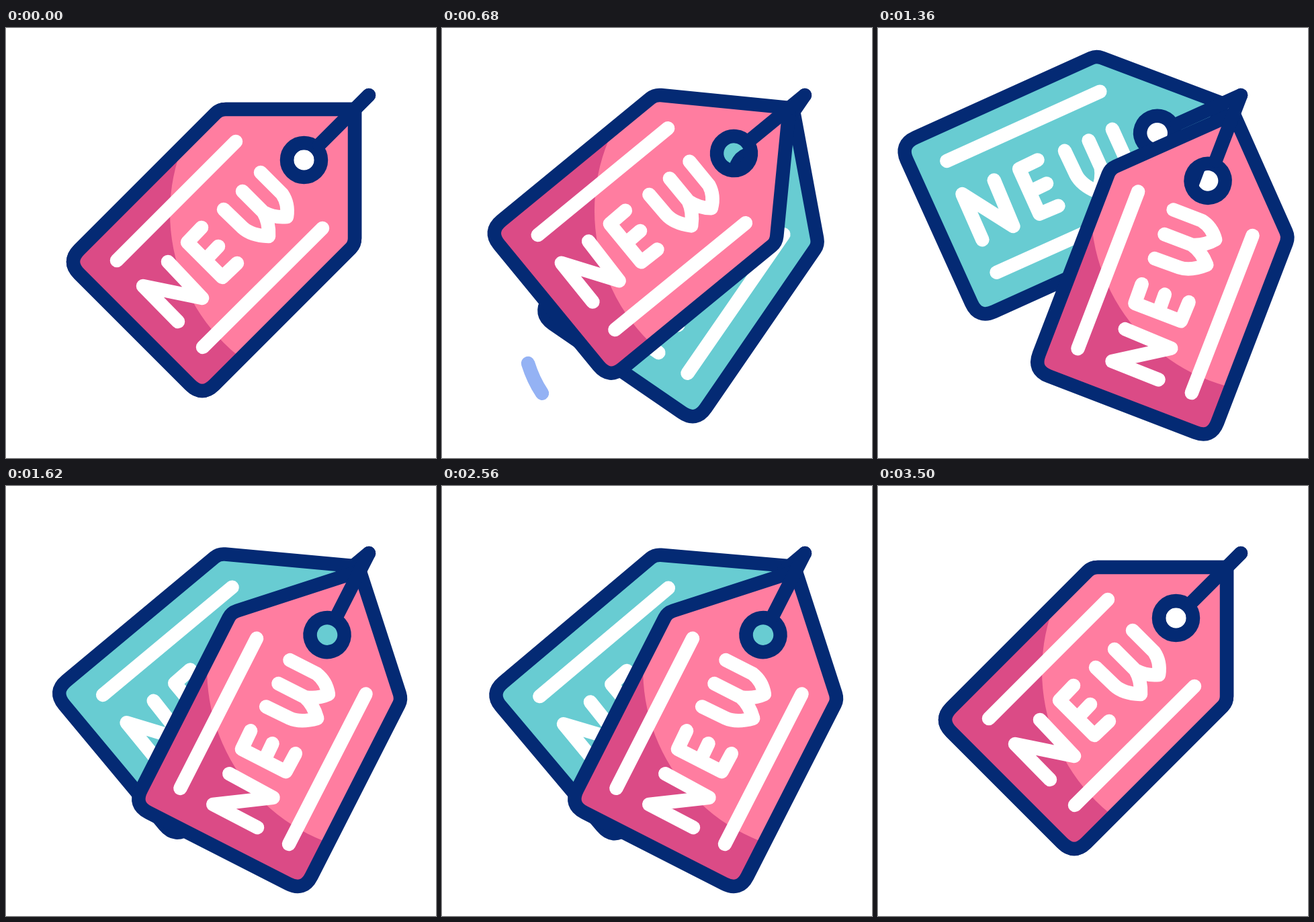
Recreate the animation shown at these times as an HTML page with a canvas. Size 640x640 px, loop 3.6 s.

```html
<!DOCTYPE html>
<html lang="en">
<head>
<meta charset="utf-8">
<title>New tags</title>
<style>
html, body { margin: 0; width: 100%; height: 100%; overflow: hidden; background: #fff; }
canvas { display: block; width: 640px; height: 640px; }
</style>
</head>
<body>
<canvas id="stage" width="640" height="640"></canvas>
<script>
const ctx = document.getElementById('stage').getContext('2d');
const LOOP = 3600, PIVOT = [540, 100], HOLE = [443.5, 196.5];
const NAVY = '#042a74', PINK = '#ff7da0', ROSE = '#db4b86', TEAL = '#68ccd2',
      YELLOW = '#ffcb52', BLUE = '#94b2f4';

const outline = new Path2D('M519 121H327Q318 121 312 127L109 330Q91 348 109 366L274 531' +
  'Q292 549 310 531L513 328Q519 322 519 313Z');
const body = new Path2D(outline);
body.moveTo(HOLE[0] + 25, HOLE[1]);
body.arc(...HOLE, 25, 0, Math.PI * 2);

const ring = new Path2D();
ring.arc(...HOLE, 25.5, 0, Math.PI * 2);
const cord = new Path2D('M466 174L540 100');
const bars = [new Path2D('M165 346L342 169'), new Path2D('M471 298L293 475')];
const BAR_LENGTH = 251;
const letters = new Path2D('M256 437L204 384L292 402L241 348' +
  'M291 297L270 319L322 371L344 350M297 345L316 325' +
  'M324 270L352 297Q365 309 391 310Q392 289 383 274L352 243' +
  'M383 274Q400 283 418 281Q421 262 411 247L379 215');

const swooshes = [
  { path: new Path2D('M128 499C150 570 215 634 350 600'), length: 272, head: [617, 852], tail: [890, 1240] },
  { path: new Path2D('M604 520C585 590 520 646 414 599'), length: 248, head: [2960, 3200], tail: [3150, 3500] }
];

// [time, degrees]
const frontSwing = [[200, 0], [580, 8.1], [1200, -26.8], [1627, -18], [2816, -18], [3256, 5.2], [3420, 0]];
const backSwing = [[200, 0], [618, -11.4], [1277, 23], [1650, 4.9], [2850, 4.9], [3280, -5], [3420, 0]];

function ease(t, from, to) {
  const x = Math.min(1, Math.max(0, (t - from) / (to - from)));
  return x * x * (3 - 2 * x);
}

function swing(t, keys) {
  let angle = keys[0][1];
  for (let i = 1; i < keys.length; i++) {
    angle += (keys[i][1] - keys[i - 1][1]) * ease(t, keys[i - 1][0], keys[i][0]);
  }
  return angle;
}

function stroke(path, color) {
  ctx.strokeStyle = color;
  ctx.stroke(path);
}

function strokePart(path, length, start, end, color) {
  if (end - start < 0.001) return;
  ctx.setLineDash([(end - start) * length, length * 2]);
  ctx.lineDashOffset = -start * length;
  stroke(path, color);
  ctx.setLineDash([]);
}

function drawTag(degrees, isFront, t) {
  ctx.save();
  ctx.translate(...PIVOT);
  ctx.rotate(degrees * Math.PI / 180);
  ctx.translate(-PIVOT[0], -PIVOT[1]);

  ctx.fillStyle = isFront ? ROSE : TEAL;
  ctx.fill(body, 'evenodd');
  if (isFront) {
    ctx.save();
    ctx.clip(body, 'evenodd');
    ctx.fillStyle = PINK;
    ctx.beginPath();
    ctx.arc(518, 275, 274, 0, Math.PI * 2);
    ctx.fill();
    ctx.restore();
  }

  stroke(letters, '#fff');
  for (const bar of bars) {
    stroke(bar, '#fff');
    if (isFront) strokePart(bar, BAR_LENGTH, ease(t, 2170, 2520), ease(t, 1820, 2170), YELLOW);
  }
  for (const part of [outline, ring, cord]) stroke(part, NAVY);
  ctx.restore();
}

function draw(now) {
  const t = now % LOOP;
  ctx.fillStyle = '#fff';
  ctx.fillRect(0, 0, 640, 640);
  ctx.lineWidth = 20.5;
  ctx.lineCap = ctx.lineJoin = 'round';
  for (const s of swooshes) {
    strokePart(s.path, s.length, ease(t, ...s.tail), ease(t, ...s.head), BLUE);
  }
  drawTag(swing(t, backSwing), false, t);
  drawTag(swing(t, frontSwing), true, t);
  requestAnimationFrame(draw);
}
requestAnimationFrame(draw);
</script>
</body>
</html>
```
